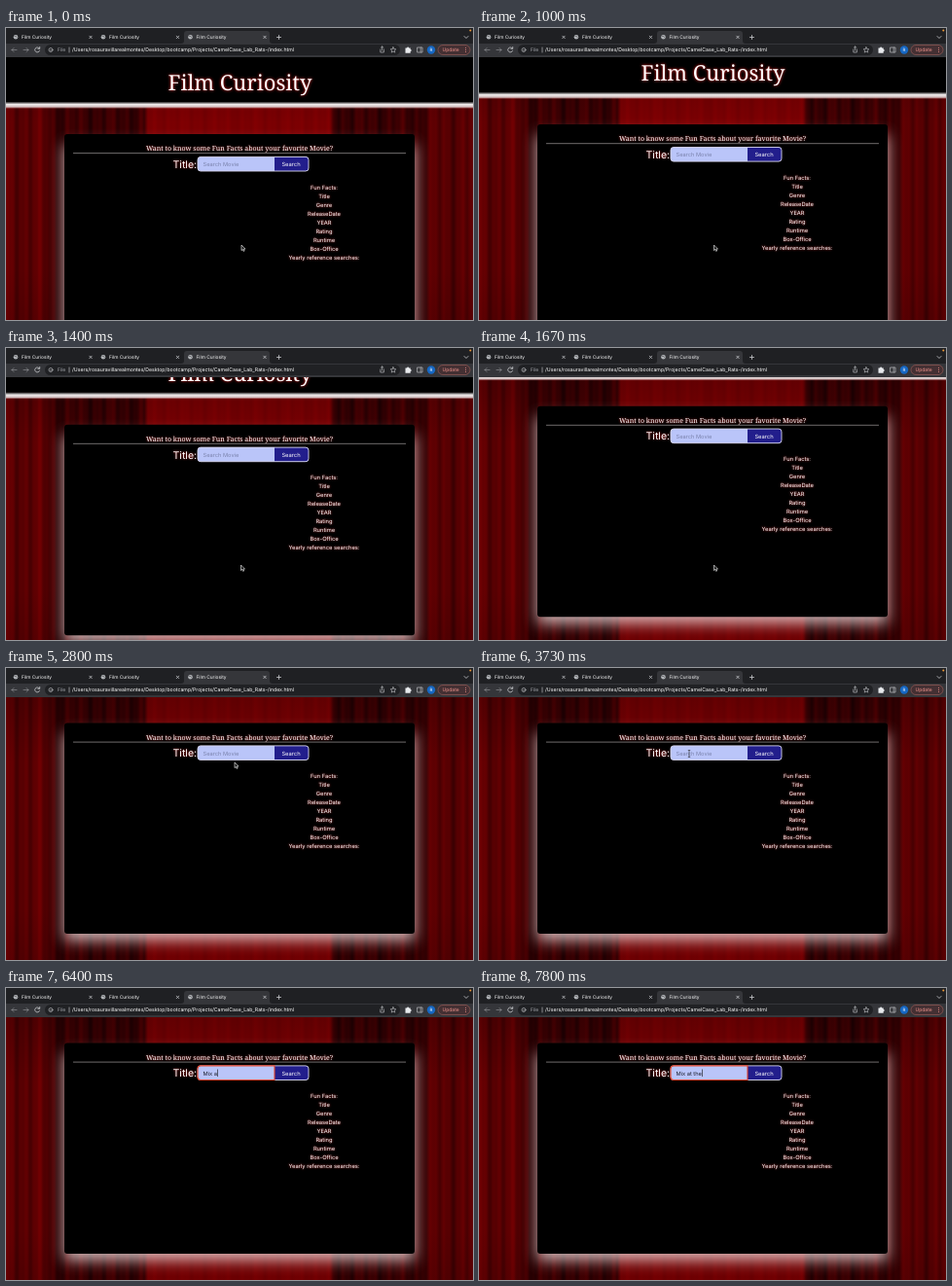
An HTML page that plays this animation: 480 px wide and 300 px high, repeating every 8 s.

```html
<!DOCTYPE html>
<html lang="en">
<head>
<meta charset="utf-8">
<title>Film Curiosity</title>
<style>
  html, body { margin: 0; width: 100%; height: 100%; overflow: hidden; background: #000; }
  svg { display: block; width: 100vw; height: 100vh; }
  text { font-family: Inter, Roboto, sans-serif; fill: #fff; white-space: pre; text-rendering: geometricPrecision; }
  .serif { font-family: "Noto Serif", "Liberation Serif", serif; }
  .mid { text-anchor: middle; }
  .glow { filter: drop-shadow(0 .4px .9px rgba(255, 40, 40, .75)); }
  .title { filter: drop-shadow(0 .4px 1.5px #f01818); }
  .line { fill: none; stroke: #c8cacd; stroke-width: .8; stroke-linecap: round; stroke-linejoin: round; }
</style>
</head>
<body>
<svg viewBox="0 0 480 300">
  <defs>
    <linearGradient id="curtain"></linearGradient>
    <linearGradient id="shade" x2="0" y2="1">
      <stop offset="0" stop-opacity=".2"/>
      <stop offset=".25" stop-opacity="0"/>
      <stop offset=".8" stop-opacity="0"/>
      <stop offset="1" stop-opacity=".1"/>
    </linearGradient>
    <linearGradient id="edge" x2="0" y2="1">
      <stop offset="0" stop-color="#000"/>
      <stop offset=".4" stop-color="#f0ecec"/>
      <stop offset=".75" stop-color="#e0d4d4" stop-opacity=".9"/>
      <stop offset="1" stop-color="#c88" stop-opacity="0"/>
    </linearGradient>
    <filter id="soft" x="-20%" y="-20%" width="140%" height="140%"><feGaussianBlur stdDeviation="7.5"/></filter>
  </defs>

  <rect y="30" width="480" height="270" fill="url(#curtain)"/>
  <rect y="30" width="480" height="270" fill="url(#shade)"/>

  <g id="page">
    <rect y="20" width="480" height="56" fill="#000"/>
    <rect y="75.5" width="480" height="7.500" fill="url(#edge)"/>
    <text class="serif mid title" x="240.5" y="64" font-size="22">Film Curiosity</text>

    <rect x="60" y="120" width="360" height="212" fill="#f6e4e4" opacity=".8" filter="url(#soft)"/>
    <rect x="60" y="109" width="360" height="216.500" rx="3" fill="#000"/>
    <text class="serif mid glow" x="240" y="126.2" font-size="7">Want to know some Fun Facts about your favorite Movie?</text>
    <path d="M69 128.6H411" stroke="#8c8888" stroke-width=".8"/>

    <text class="glow" x="171.5" y="143.8" font-size="10.6">Title:</text>
    <rect x="197" y="132.4" width="114" height="14.6" rx="3" fill="#bac5f9"/>
    <path d="M276 132.4h32a3 3 0 0 1 3 3v8.600a3 3 0 0 1-3 3h-32z" fill="#221e8c"/>
    <rect x="197" y="132.4" width="114" height="14.6" rx="3" fill="none" stroke="#d9d6ee" stroke-width=".9"/>
    <path id="focus" d="M276 132.4h-76a3 3 0 0 0-3 3v8.600a3 3 0 0 0 3 3h76z" fill="none" stroke="#e0452f" stroke-width="1.1"/>
    <text class="mid" x="293" y="142.2" font-size="5.8">Search</text>
    <text id="entry" x="202.5" y="142" font-size="5.7"></text>
    <rect id="caret" y="136" width=".6" height="7.600" fill="#111"/>
    <g id="facts" class="glow"></g>
  </g>

  <g id="chrome">
    <rect width="480" height="30" fill="#1f2023"/>
    <path d="M180 16q3 0 3-3V6q0-3 3-3h82q3 0 3 3v7q0 3 3 3z" fill="#35363a"/>
    <rect y="16" width="480" height="14" fill="#35363a"/>
    <rect x="40" y="17" width="365" height="11" rx="5.5" fill="#202124"/>
    <g id="tabs"></g>
    <path class="line" d="M278.500 9.500h4M280.500 7.500v4M471 8.500l2 2 2-2"/>
    <circle cx="477.300" cy="2.600" r="1" fill="#f09a37"/>
    <path class="line" d="M11 22.500H6m2-2-2 2 2 2M18 22.500h5m-2-2 2 2-2 2" opacity=".5"/>
    <path class="line" d="M34.300 21a2.500 2.500 0 1 0 .2 2.500M34.700 19.500v1.800h-1.800"/>
    <g class="line" opacity=".8">
      <circle cx="46" cy="22.500" r="2"/>
      <path d="M46 22.400v1M65 20v5M384.800 22v3h3.600v-3M386.600 23v-4m-1.300 1.200 1.300-1.200 1.300 1.200"/>
      <path d="M398 19.700l.8 1.900 2 .2-1.500 1.300.5 2-1.800-1.100-1.800 1.100.5-2-1.500-1.300 2-.2z"/>
      <path d="M423 20h5v5h-5zM426.200 20v5"/>
    </g>
    <path d="M410.500 20.500h1.600a1 1 0 0 1 2 0h1.600v1.600a1 1 0 0 1 0 2v1.600h-5.200z" fill="#e8eaed"/>
    <text x="53" y="24.300" font-size="5" style="fill:#a5a8ad">File</text>
    <text x="68" y="24.400" font-size="5.2">/Users/rosauravillarealmontes/Desktop/bootcamp/Projects/CamelCase_Lab_Rats-/index.html</text>
    <circle cx="437" cy="22.500" r="4.200" fill="#1668c4"/>
    <text class="mid" x="437" y="24.200" font-size="4.500">R</text>
    <rect x="444" y="17.500" width="33" height="10" rx="5" fill="#443033" stroke="#a5605c" stroke-width=".6"/>
    <text x="448.500" y="24.300" font-size="5" style="fill:#f0938b">Update</text>
    <path d="M472.500 20.300v.01M472.500 22.400v.01M472.500 24.500v.01" stroke="#f0938b" stroke-width="1" stroke-linecap="round"/>
  </g>

  <path id="pointer" d="M0 0v5.600l1.300-1.200.9 2 .9-.4-.9-1.900h1.800z" fill="#111" stroke="#fff" stroke-width=".6"/>
  <path id="beam" d="M-1.200-3.500h2.400M0-3.500v7M-1.200 3.500h2.400" fill="none" stroke="#222" stroke-width=".6"/>
</svg>
<script>
const LOOP = 8000, STEP = 1000 / 15, BLINK = 530;
const $ = id => document.getElementById(id);

// [time, value...]
const scrollTrack = [[880, 0], [1000, 9.7], [1400, 30], [1670, 49.3], [1930, 52.5]];
const mouseTrack = [[70, 242, 223], [130, 241.5, 223], [2020, 241.5, 223], [2400, 242, 160],
  [2800, 235, 97], [2950, 235, 97], [3730, 216, 88]];
const keys = [4330, 5130, 5330, 5930, 6400, 6530, 6800, 7330, 7600, 7800];
const typed = "Mix at the";
const FOCUS = 3870;

// Brightness of the cloth from left to right: lit sides and centre, dark between
const clothTrack = [[0, 92], [40, 88], [52, 58], [142, 56], [146, 122], [333, 122], [337, 56], [425, 58], [440, 84], [480, 88]];

function sample(track, t) {
  const i = track.findIndex(p => p[0] > t);
  if (i === 0) return track[0].slice(1);
  if (i < 0) return track[track.length - 1].slice(1);
  const a = track[i - 1], b = track[i], k = (t - a[0]) / (b[0] - a[0]);
  return a.slice(1).map((v, n) => v + (b[n + 1] - v) * k);
}

let stops = "";
for (let x = 0; x <= 480; x += 2) {
  const lit = x > 144 && x < 335;
  const folds = Math.sin(x * .42) + .7 * Math.sin(x * .91 + 1) + .6 * Math.sin(x * .17 + 2);
  const r = Math.round(sample(clothTrack, x)[0] + folds * (lit ? 4 : 13));
  stops += `<stop offset="${x / 480}" stop-color="rgb(${r},0,2)"/>`;
}
$("curtain").innerHTML = stops;

$("facts").innerHTML = ["Fun Facts:", "Title", "Genre", "ReleaseDate", "YEAR", "Rating", "Runtime",
  "Box-Office", "Yearly reference searches:"]
  .map((s, i) => `<text class="mid" x="327" y="${165.6 + i * 9}" font-size="5.75">${s}</text>`).join("");

$("tabs").innerHTML = [[10, 87], [100, 176.5], [189.5, 266]].map(([x, close]) =>
  `<circle cx="${x}" cy="9.300" r="2.300" fill="#b4b7bb"/>
   <path d="M${x - 1.5} 8.600h2l1 1.400" fill="none" stroke="#444" stroke-width=".6"/>
   <text x="${x + 6}" y="11" font-size="4.800">Film Curiosity</text>
   <path class="line" d="M${close - 1.2} 8.200l2.400 2.400m0-2.400l-2.400 2.400"/>`).join("");

const show = (el, on) => el.setAttribute("visibility", on ? "visible" : "hidden");

function draw(t) {
  $("page").setAttribute("transform", `translate(0 ${-sample(scrollTrack, t)[0]})`);

  const count = keys.filter(k => k <= t).length;
  const entry = $("entry"), text = count ? typed.slice(0, count) : "Search Movie";
  if (entry.textContent !== text) entry.textContent = text;
  entry.style.fill = count ? "#1c1e2c" : "#7b83ad";

  const focused = t >= FOCUS;
  const lastKey = count ? keys[count - 1] : FOCUS;
  show($("focus"), focused);
  show($("caret"), focused && t - lastKey < BLINK);
  $("caret").setAttribute("x", 202.7 + (count ? entry.getComputedTextLength() : 0));

  const [x, y] = sample(mouseTrack, t), overField = y < 94;
  show($("pointer"), !count && !overField);
  show($("beam"), !count && overField);
  for (const id of ["pointer", "beam"]) $(id).setAttribute("transform", `translate(${x} ${y})`);
}

const start = performance.now();
function tick() {
  const t = (performance.now() - start) % LOOP;
  draw(Math.floor(t / STEP + .1) * STEP + 4);
  requestAnimationFrame(tick);
}
tick();
</script>
</body>
</html>
```
